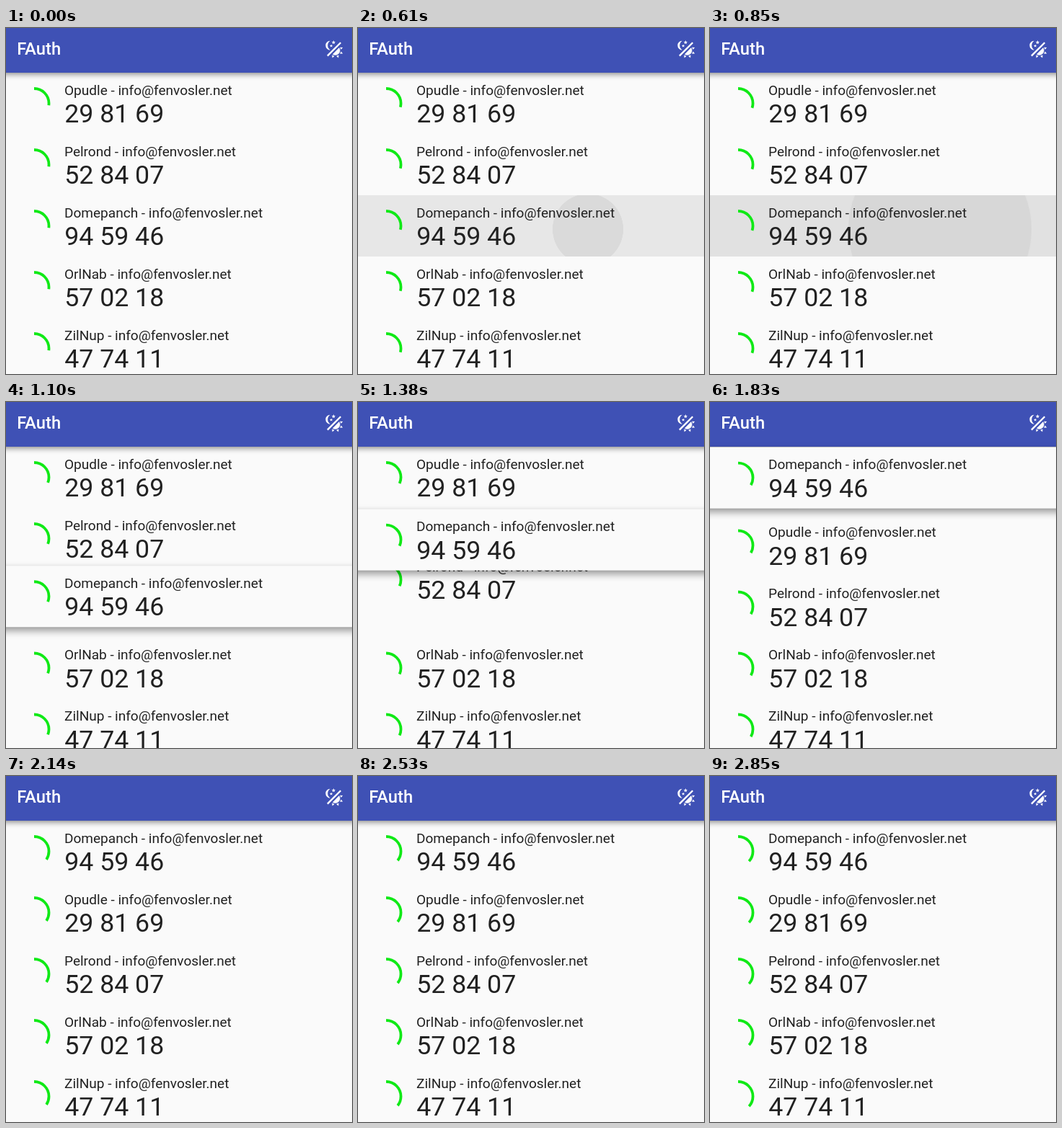
An HTML page for the animation above (2910 ms loop, 480 by 480 pixels).

```html
<!DOCTYPE html>
<html lang="en">
<head>
<meta charset="utf-8">
<title>FAuth</title>
<style>
  html, body { margin: 0; width: 100%; height: 100%; overflow: hidden; background: #fafafa; }
  body { position: relative; font-family: Roboto, sans-serif; }
  svg { display: block; }

  /* Side padding keeps the shadow's fading ends outside the stage. */
  .bar, .row { position: absolute; left: -24px; width: 480px; padding: 0 24px; }

  .bar {
    z-index: 1; top: 0; height: 62px;
    background: #3f51b5;
    box-shadow: 0 3px 7px rgba(0, 0, 0, .38), 0 0 2px rgba(0, 0, 0, .1);
  }
  .bar svg { fill: #fff; }
  .title { font-size: 23.8px; font-weight: 500; }

  .row { height: 85px; animation: 2910ms linear infinite; }
  .row svg { fill: #212121; }
  .label { font-size: 19.04px; }
  .code { font-size: 35.7px; }
  .ring {
    fill: none; stroke: #10e916; stroke-width: 3.8;
    animation: fill-ring 2910ms linear infinite;
  }
  .first { animation-name: first; }
  .second { animation-name: second; }
  .below { animation-name: below; }
  .dragged {
    background: #fafafa;
    animation-name: drag, lift, press;
    animation-timing-function: linear, step-end, linear;
  }
  .splash {
    fill: #c8c8c8; transform-origin: 319px 47px;
    animation: splash 2910ms linear infinite;
  }

  @keyframes fill-ring {
    from { stroke-dasharray: 98 360; }
    to { stroke-dasharray: 133 360; }
  }
  @keyframes splash {
    0%, 15.81% { transform: scale(0); opacity: 0; }
    18.38% { opacity: .4; }
    29.55% { transform: scale(130); opacity: .4; }
    29.56%, 100% { transform: scale(130); opacity: 0; }
  }
  @keyframes press {
    0%, 15.81% { background: #fafafa; }
    22.68%, 29.55% { background: #e1e1e1; }
    29.56%, 100% { background: #fafafa; }
  }
  @keyframes lift {
    0% { z-index: 0; box-shadow: none; }
    29.55% { z-index: 2; box-shadow: 0 5px 10px rgba(0, 0, 0, .4), 0 0 2px rgba(0, 0, 0, .06); }
    67.01%, 100% { z-index: 0; box-shadow: none; }
  }
  @keyframes drag {
    0%, 34.36% { transform: translateY(0); }
    37.8% { transform: translateY(-4.5px); }
    43.3% { transform: translateY(-47px); }
    47.42% { transform: translateY(-83px); }
    52.03% { transform: translateY(-132px); }
    56.7% { transform: translateY(-157px); }
    60.14% { transform: translateY(-167px); }
    63.57%, 100% { transform: translateY(-170px); }
  }
  @keyframes first {
    0%, 52.03% { transform: translateY(0); }
    58.9%, 67.01% { transform: translateY(94.5px); }
    67.7%, 100% { transform: translateY(85px); }
  }
  @keyframes second {
    0%, 43.3% { transform: translateY(0); }
    50.17%, 67.01% { transform: translateY(94.5px); }
    67.7%, 100% { transform: translateY(85px); }
  }
  @keyframes below {
    0%, 29.55% { transform: translateY(0); }
    29.56%, 67.01% { transform: translateY(9.5px); }
    67.7%, 100% { transform: translateY(0); }
  }
</style>
</head>
<body>
<header class="bar">
  <svg width="480" height="62">
    <text class="title" x="15.2" y="37.3">FAuth</text>
    <g transform="translate(441 15.3) scale(1.18)">
      <path d="M7.5 2a5.5 5.5 0 0 0 0 11a6.5 6.5 0 0 1 0-11z"/>
      <path d="M19.8 4.2 4.2 19.8" stroke="#fff" stroke-width="2"/>
      <path id="star" d="M12.9 5.9 11.4 5 10 6 10.4 4.3 9 3.2 10.8 3.1 11.3 1.5 12 3.1 13.7 3.1 12.4 4.3z"/>
      <use href="#star" transform="translate(-.28 4.9) scale(.78)"/>
      <path d="M19 13.5A5.5 5.5 0 0 1 13.5 19Q11.7 19 10.2 17.9L17.9 10.2Q19 11.7 19 13.5z"/>
      <path d="M14.6 20.1 17.4 18.9 17.1 22.3zM18.9 17.4 20.1 14.6 22.3 17.1zM20.1 12.4 18.9 9.6 22.3 9.9zM9.6 18.9 12.4 20.1 9.9 22.3z"/>
    </g>
  </svg>
</header>
<script>
  const accounts = [
    ["Opudle", "29 81 69", "first"],
    ["Pelrond", "52 84 07", "second"],
    ["Domepanch", "94 59 46", "dragged"],
    ["OrlNab", "57 02 18", "below"],
    ["ZilNup", "47 74 11", "below"],
  ];

  const rowMarkup = ([name, code, role], index) => `
    <div class="row ${role}" style="top:${62 + 85 * index}px">
      <svg width="480" height="85">
        ${role === "dragged" ? '<circle class="splash" cx="319" cy="47" r="1"/>' : ""}
        <circle class="ring" cx="39" cy="42.5" r="20.5" pathLength="360" transform="rotate(-90 39 42.5)"/>
        <text class="label" x="81" y="30.8">${name} - info@fenvosler.net</text>
        <text class="code" x="81.2" y="69">${code}</text>
      </svg>
    </div>`;

  document.body.insertAdjacentHTML("beforeend", accounts.map(rowMarkup).join(""));
</script>
</body>
</html>
```
